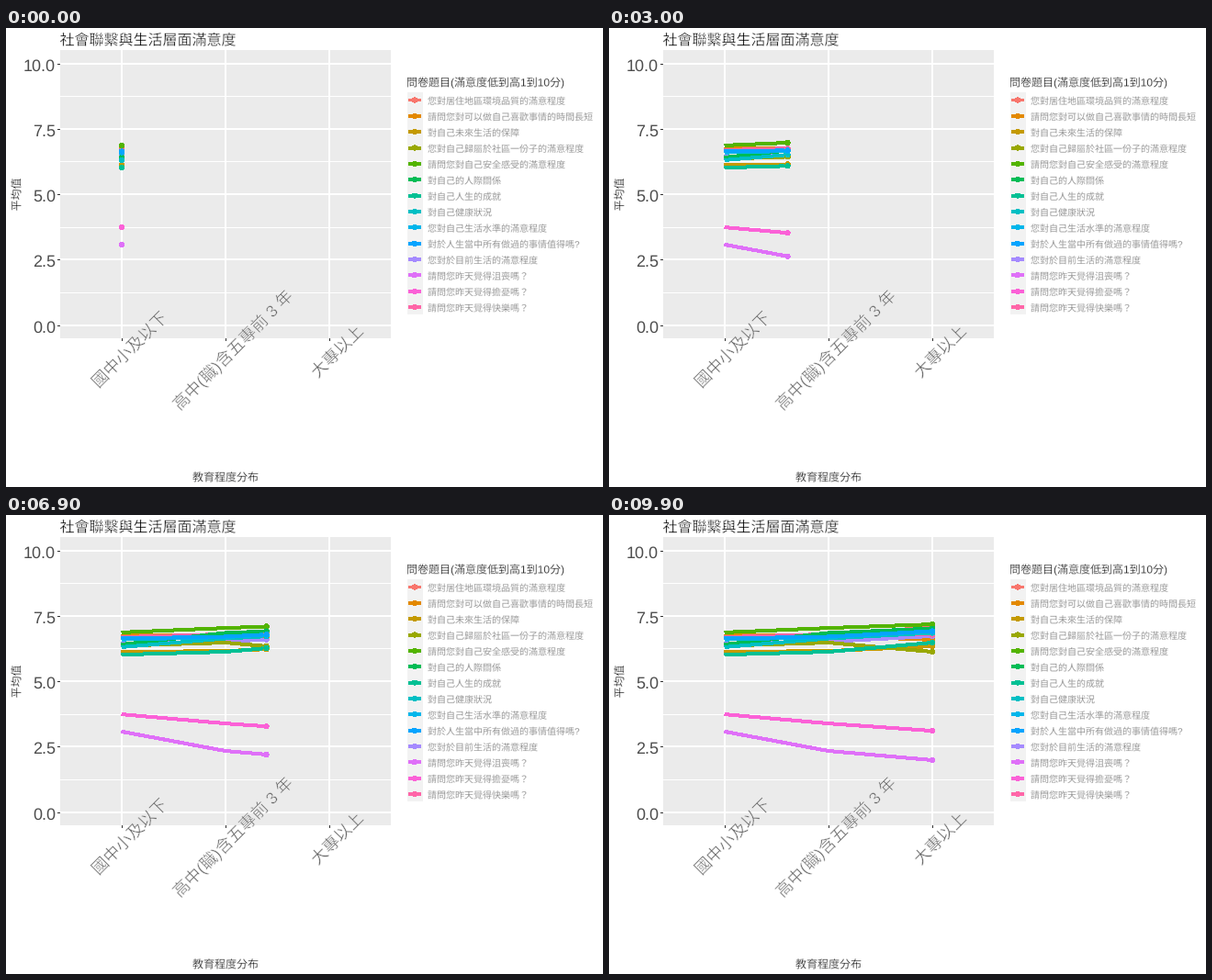
Recreate the animation shown at these times as a matplotlib script. Size 650 by 500 pixels, loop 10 s.

```python
import numpy as np
import matplotlib.pyplot as plt
from matplotlib.animation import FuncAnimation
from matplotlib.patches import Circle, Rectangle
from matplotlib.patheffects import Stroke

W, H, DPI = 650, 500, 100
PT = 72 / DPI  # points per pixel
FRAMES, INTERVAL = 100, 100

plt.rcParams["font.family"] = ["Liberation Sans", "Noto Sans CJK JP"]
plt.rcParams["font.weight"] = "light"
plt.rcParams["text.hinting"] = "none"

LEVELS = ["國中小及以下", "高中(職)含五專前 3 年", "大專以上"]
TICK_X = np.array([126, 239, 352])

# question, colour, mean score per education level
SERIES = [
    ("您對居住地區環境品質的滿意程度", "#F8766D", (6.75, 6.74, 7.09)),
    ("請問您對可以做自己喜歡事情的時間長短", "#E38900", (6.78, 6.75, 6.60)),
    ("對自己未來生活的保障", "#C49A00", (6.14, 6.17, 6.35)),
    ("您對自己歸屬於社區一份子的滿意程度", "#99A800", (6.37, 6.49, 6.14)),
    ("請問您對自己安全感受的滿意程度", "#53B400", (6.88, 7.05, 7.19)),
    ("對自己的人際關係", "#00BC56", (6.42, 6.86, 7.03)),
    ("對自己人生的成就", "#00C094", (6.03, 6.14, 6.49)),
    ("對自己健康狀況", "#00BFC4", (6.32, 6.65, 6.86)),
    ("您對自己生活水準的滿意程度", "#00B6EB", (6.61, 6.70, 6.92)),
    ("對於人生當中所有做過的事情值得嗎?", "#06A4FF", (6.65, 6.72, 6.93)),
    ("您對於目前生活的滿意程度", "#A58AFF", (6.44, 6.53, 6.74)),
    ("請問您昨天覺得沮喪嗎？", "#DF70F8", (3.09, 2.35, 2.00)),
    ("請問您昨天覺得擔憂嗎？", "#FB61D7", (3.75, 3.40, 3.12)),
    ("請問您昨天覺得快樂嗎？", "#FF66A8", (6.70, 6.81, 6.79)),
]
DRAW_ORDER = [0, 1, 10, 13, 2, 3, 4, 5, 6, 7, 8, 9, 11, 12]

fig = plt.figure(figsize=(W / DPI, H / DPI), dpi=DPI, facecolor="white")
ax = fig.add_axes([0, 0, 1, 1])
ax.set_xlim(0, W)
ax.set_ylim(H, 0)
ax.axis("off")


def score_y(v):
    return 324 - 28.5 * np.asarray(v)


def box(x0, y0, x1, y1, color):
    ax.add_patch(Rectangle((x0, y0), x1 - x0, y1 - y0, fc=color, lw=0, zorder=0))


def stroke(xs, ys, color, width, z=1):
    return ax.plot(xs, ys, color=color, lw=width * PT, zorder=z, snap=False,
                   antialiased=False, solid_capstyle="butt",
                   solid_joinstyle="round")[0]


def dot(x, y, color, z):
    return ax.add_patch(Circle((x, y), 2.6, fc=color, lw=0, zorder=z,
                               antialiased=False, snap=False))


def label(x, y, text, size, color="black", ha="left", angle=0, thin=0.025):
    """Place text with its glyphs centred on y, across the writing direction.

    A pale outline of width thin * size slims the strokes.
    """
    a = np.radians(angle)
    drop = 0.37 * size
    t = ax.text(x + drop * np.sin(a), y + drop * np.cos(a), text, size=size * PT,
                color=color, ha=ha, va="baseline", rotation=angle,
                rotation_mode="anchor", zorder=5)
    if thin:
        t.set_path_effects([Stroke(linewidth=thin * size * PT,
                                   foreground="#F5F5F5")])


def draw_panel():
    box(59, 24, 419, 338, "#EBEBEB")
    for v in (1.25, 3.75, 6.25, 8.75):
        y = np.floor(score_y(v)) + 0.5
        stroke([59, 419], [y, y], "white", 1)
    for v in (0, 2.5, 5, 7.5, 10):
        y = np.floor(score_y(v))
        stroke([59, 419], [y, y], "white", 2)
        stroke([56, 59], [y + 0.5, y + 0.5], "#333333", 1)
        label(54, y + 1, f"{v:.1f}", 18, "#4D4D4D", "right", thin=0)
    centers = [(134, 350), (246.5, 350.5), (360, 352)]
    for x, name, (cx, cy) in zip(TICK_X, LEVELS, centers):
        stroke([x, x], [24, 338], "white", 2)
        stroke([x + 0.5, x + 0.5], [338, 341], "#333333", 1)
        label(cx, cy, name, 18, "#666666", "center", 45)
    label(58.5, 12.5, "社會聯繫與生活層面滿意度", 16)
    label(239, 489, "教育程度分布", 12, ha="center")
    label(11, 181.5, "平均值", 12, ha="center", angle=90)


def draw_legend():
    label(436, 59, "問卷題目(滿意度低到高1到10分)", 12)
    box(437, 70, 454, 312, "#F2F2F2")
    for i, (name, color, _) in enumerate(SERIES):
        y = 78.5 + 17.35 * i
        stroke([438, 452], [y, y], color, 3, 2)
        dot(445, y, color, 3)
        label(459, y + 0.8, name, 10, "#707070")


draw_panel()
draw_legend()

tracks = []
for k, i in enumerate(DRAW_ORDER):
    _, color, scores = SERIES[i]
    line = stroke([], [], color, 3, 2 + k / 100)
    tracks.append((line, dot(0, 0, color, 3 + k / 100), score_y(scores)))


def update(n):
    head = TICK_X[0] + (TICK_X[-1] - TICK_X[0]) * n / (FRAMES - 1)
    passed = TICK_X < head
    for line, point, ys in tracks:
        y = np.interp(head, TICK_X, ys)
        line.set_data(np.append(TICK_X[passed], head), np.append(ys[passed], y))
        point.center = head, y
    return [artist for t in tracks for artist in t[:2]]


anim = FuncAnimation(fig, update, frames=FRAMES, interval=INTERVAL,
                     repeat=True, repeat_delay=0, blit=False)
plt.show()
```
